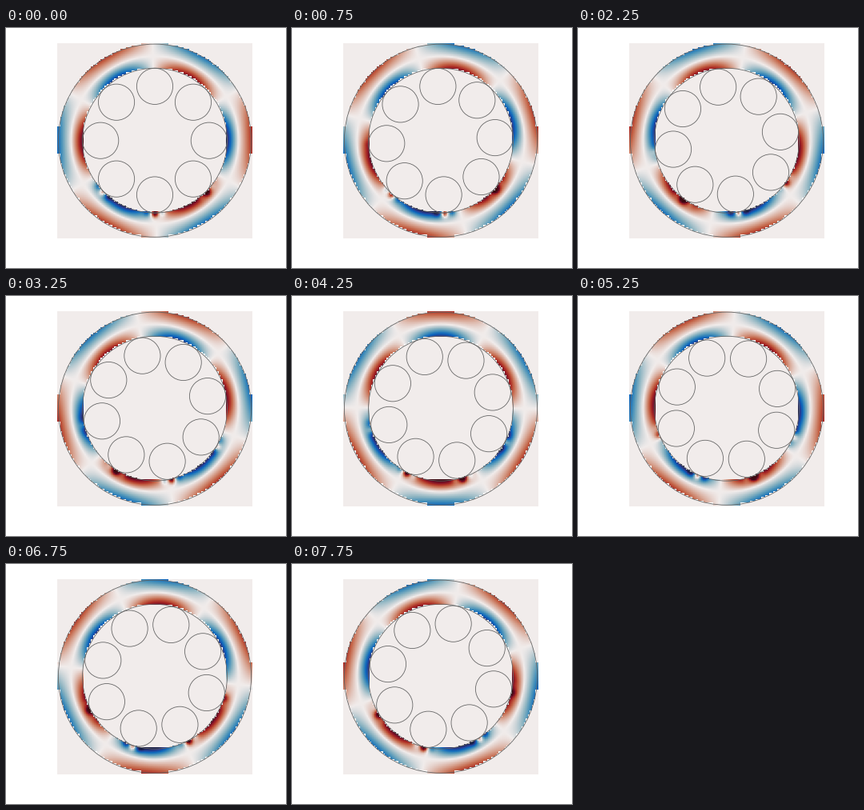
A matplotlib script for the animation above (8000 ms loop, 350 px wide and 300 px high).

```python
import numpy as np
import matplotlib.pyplot as plt
from matplotlib.animation import FuncAnimation
from matplotlib.colors import LinearSegmentedColormap
from matplotlib.patches import Circle

W, H, DPI = 350, 300, 100
FRAMES, INTERVAL = 32, 250
INNER, ROLLER = 0.75, 0.1875
ROLLERS = 8
STEP = np.radians(1.022)  # roller cage advance per frame
NEUTRAL = "#f1eceb"

stops = ["#171c42", "#293a8f", "#0b66bd", "#4590b9", "#8eb5c2", "#d2d8db",
         NEUTRAL,
         "#e6d2cc", "#d59d89", "#c46548", "#ac2b24", "#780e28", "#3c0911"]
half = np.arange(6) / 11
places = [*half, 0.5, *(1 - half[::-1])]
cmap = LinearSegmentedColormap.from_list("bluered", list(zip(places, stops)), 512)

axis = np.linspace(-1, 1, 101)
X, Y = np.meshgrid(axis, axis)
R, T = np.hypot(X, Y), np.arctan2(Y, X)
ring = (R <= 1.01) & (R >= INNER - 0.01)
depth = (0.866 - R) / 0.116
inner_gain = 0.9 - 0.12 * np.sin(T)  # stronger towards the loaded bottom
profile = depth * np.where(depth > 0, inner_gain, 0.53)


def roller_angles(i):
    return np.pi / 2 + i * STEP + np.arange(ROLLERS) * 2 * np.pi / ROLLERS


def wave_angle(i):
    wobble = 2.2 * np.sin(2 * np.pi * (i - 8.3) / 11)
    return np.radians(59 + i * 60 / 11 + wobble)


def contact(angle):
    """Local stress where a loaded roller presses on the ring."""
    load = max(0.0, -np.sin(angle))
    along = INNER * ((T - angle + np.pi) % (2 * np.pi) - np.pi)
    fade = np.exp(-((R - INNER) / 0.045) ** 2)
    core = 1.25 * np.exp(-(along / 0.033) ** 2)
    sides = sum(np.exp(-((along - s) / 0.035) ** 2) for s in (-0.08, 0.08))
    return load * fade * (core - 0.35 * sides)


def field(i):
    stress = profile * np.cos(3 * (T - wave_angle(i)))
    for angle in roller_angles(i):
        stress = stress + contact(angle)
    return np.where(ring, np.clip(stress, -1, 1), np.nan)


fig = plt.figure(figsize=(W / DPI, H / DPI), dpi=DPI, facecolor="white")
ax = fig.add_axes([64.2 / W, 37.5 / H, 243.6 / W, 243.6 / H])
ax.set(facecolor=NEUTRAL, xticks=[], yticks=[])
ax.spines[:].set_visible(False)
ax.add_patch(Circle((0, 0), 1, color="white", lw=0, zorder=0.1))
ax.add_patch(Circle((0, 0), INNER, color=NEUTRAL, lw=0, zorder=0.2))
image = ax.imshow(field(0), cmap=cmap, vmin=-1, vmax=1, origin="lower",
                  extent=(-1.01, 1.01, -1.01, 1.01), aspect="auto",
                  interpolation="hanning", interpolation_stage="data",
                  zorder=0.5)


def outline(radius):
    return ax.add_patch(Circle((0, 0), radius, fill=False,
                               edgecolor="#666666", linewidth=0.6))


outline(1)
outline(INNER)
rollers = [outline(ROLLER) for _ in range(ROLLERS)]


def update(i):
    image.set_data(field(i))
    orbit = INNER - ROLLER
    for roller, angle in zip(rollers, roller_angles(i)):
        roller.center = orbit * np.cos(angle), orbit * np.sin(angle)
    return [image, *rollers]


anim = FuncAnimation(fig, update, frames=FRAMES, interval=INTERVAL,
                     repeat=True, repeat_delay=0)
plt.show()
```
